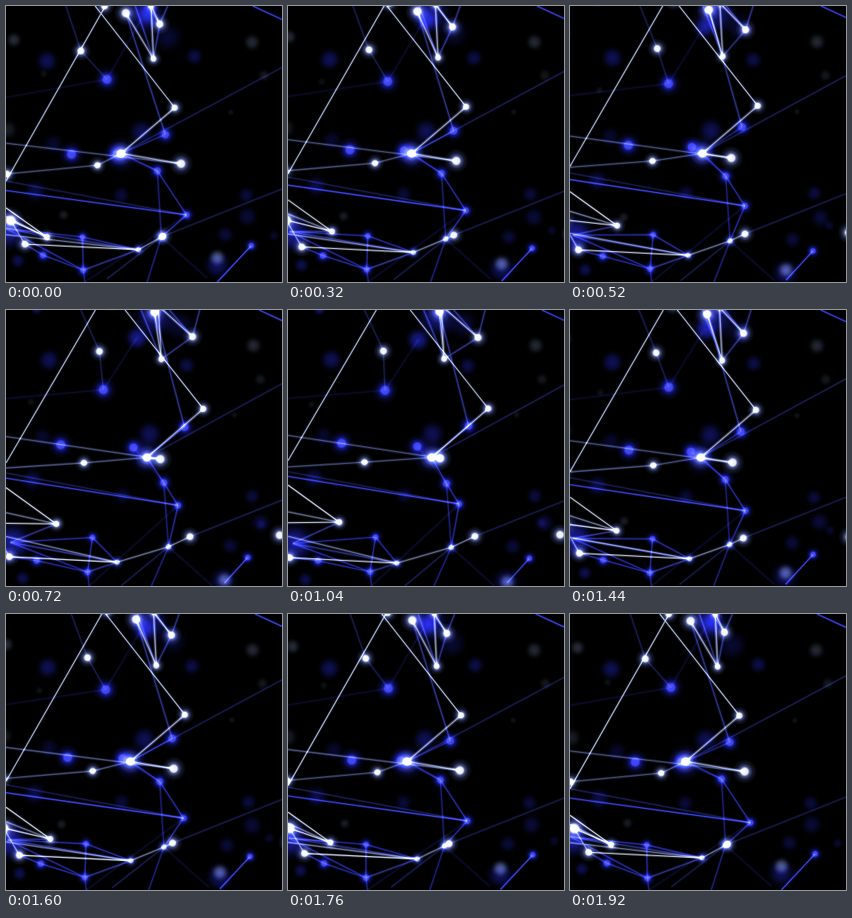
An HTML page with a canvas that plays this animation: 350 px wide and 350 px high, repeating every 1.96 s.

```html
<!DOCTYPE html>
<html lang="en">
<head>
<meta charset="utf-8">
<title>Drifting network</title>
<style>
html, body { margin: 0; width: 100%; height: 100%; overflow: hidden; background: #000; }
canvas { display: block; width: 350px; height: 350px; }
</style>
</head>
<body>
<canvas id="stage" width="350" height="350"></canvas>
<script>
const ctx = document.getElementById('stage').getContext('2d');
const STEP = 40, STEPS = 49;

// Sway: [step, position, slope]
const sway = [[0, 0, .02], [8, .297, .052], [18, .904, .05], [23.5, 1.015, 0],
  [26, 1, -.025], [36, .547, -.054], [40, .322, -.052], [48, .02, -.02], [49, 0, -.02]];

// Points: x, y at rest, x, y at full sway, radius
const white = {
  a: [214, 129, 254, 125, 4.6], b: [187, 67, 198, 62, 4.3], c: [195, 23, 241, 35, 5.2],
  d: [152, 9, 192, 2, 6], y: [184, 0, 194, -6, 4], e: [95, 57, 121, 52, 5],
  h: [146, 187, 182, 187, 6], i: [116, 202, 97, 193, 4.6], w: [222, 200, 193, 188, 6],
  l: [199, 292, 237, 287, 5], n: [52, 293, 65, 269, 4.4], q: [24, 302, 2, 314, 5],
  r: [6, 272, -22, 270, 7], v: [1, 213, -16, 200, 5], u: [366, 291, 345, 285, 5.5],
  x: [125, 0, 135, -12, 5]
};
const pale = { z: [197, 293, 207, 301, 4], m: [168, 309, 138, 321, 3.8] };
const blue = {
  f: [128, 93, 123, 102, 6.5], g: [202, 163, 229, 147, 5.6], j: [192, 209, 201, 220, 5],
  k: [229, 265, 217, 246, 4.4], o: [97, 293, 111, 288, 4], p: [98, 335, 104, 332, 4.4],
  s: [47, 316, 38, 318, 4.5], t: [311, 304, 306, 315, 4], '1': [83, 188, 68, 169, 6.5],
  '2': [140, 188, 164, 173, 6]
};
// Line ends beyond or on the border
const rim = {
  A: [0, 222, 0, 191], B: [126, 0, 112, 0], C: [113, 0, 155, 0], D: [350, 78, 350, 95],
  E: [0, 174, 0, 159], F: [0, 213, 0, 199], G: [0, 234, 0, 211], H: [0, 222, 0, 205],
  I: [179, 350, 185, 350], J: [350, 232, 350, 242], K: [128, 346, 148, 350],
  L: [0, 256, 0, 222], M: [0, 267, 0, 256], N: [0, 290, 0, 287], O: [268, 350, 278, 346],
  P: [313, 0, 322, 0], Q: [350, 17, 350, 13], R: [76, 0, 97, 0], S: [0, 116, 0, 112],
  T: [164, 0, 172, 0], U: [205, 0, 250, 0], V: [180, 0, 210, 0], W: [255, 345, 262, 350],
  X: [100, 350, 106, 350], Y: [0, 282, 6, 296], Z: [172, 16, 165, 38]
};
// Out-of-focus spots, last value is strength
const blueHaze = [
  [52, 70, 55, 63, 16, .38], [239, 64, 228, 71, 13, .32], [180, 10, 165, 38, 17, .6],
  [176, 10, 190, 8, 30, .5], [172, 160, 183, 157, 18, .38], [37, 235, 33, 213, 16, .3],
  [305, 240, 313, 236, 12, .28], [278, 290, 285, 300, 13, .25], [306, 267, 325, 270, 15, .25],
  [2, 284, 8, 296, 28, .65], [15, 323, 22, 342, 11, .35], [146, 240, 148, 235, 13, .25],
  [268, 328, 277, 345, 20, .4], [60, 175, 45, 160, 15, .2], [146, 188, 182, 186, 24, .5],
  [28, -14, 40, -1, 9, .5], [340, 291, 322, 270, 8, .2], [205, 40, 222, 18, 22, .22]
];
const grayHaze = [
  [312, 46, 314, 45, 12, .28], [10, 43, -20, 30, 11, .3], [268, 319, 278, 345, 12, .55],
  [73, 265, 65, 270, 8, .2], [2, 157, -16, 150, 14, .2], [285, 135, 290, 133, 5, .13],
  [327, 88, 322, 88, 9, .16], [48, 86, 30, 120, 6, .12]
];
// Line groups: pairs of points, colour, strength, glow
const lines = [
  ['AB Ca', '195,212,255', .88, .12],
  ['Ln qm nr', '220,230,255', .85, .15],
  ['yb yc db ha hw', '190,205,255', .62, .25],
  ['Nm mz lz Mn qr', '175,190,255', .55, .14],
  ['iF ih Ew', '130,150,235', .48, .14],
  ['Gk Ot PQ', '60,70,255', .9, .18],
  ['om op qs sp Yp Yo jk zk hj', '55,65,250', .62, .14],
  ['hg jz zI Xp YD1'.slice(0, 11), '50,60,240', .5, .12],
  ['bT cV cU cb dg Yn Ym pm', '75,90,245', .5, .16],
  ['Hk lJ hD zK eR ef', '65,75,225', .34, .08],
  ['fS fZ zW j2 kX', '45,50,215', .18, .06]
];

const points = Object.assign({}, white, pale, blue, rim);

function swayAt(step) {
  const n = sway.findIndex(key => key[0] > step);
  const [x0, y0, m0] = sway[n - 1], [x1, y1, m1] = sway[n];
  const d = x1 - x0, s = (step - x0) / d, s2 = s * s, s3 = s2 * s;
  return (2 * s3 - 3 * s2 + 1) * y0 + (s3 - 2 * s2 + s) * d * m0
    + (3 * s2 - 2 * s3) * y1 + (s3 - s2) * d * m1;
}

const place = (p, u) => [p[0] + (p[2] - p[0]) * u, p[1] + (p[3] - p[1]) * u];

function spot([x, y], r, stops) {
  const fill = ctx.createRadialGradient(x, y, 0, x, y, r);
  stops.forEach(([at, rgb, alpha]) => fill.addColorStop(at, `rgba(${rgb},${alpha})`));
  ctx.fillStyle = fill;
  ctx.fillRect(x - r, y - r, 2 * r, 2 * r);
}

function haze(spots, rgb, u) {
  spots.forEach(p => spot(place(p, u), p[4],
    [[0, rgb, p[5]], [.4, rgb, p[5] * .7], [.75, rgb, p[5] * .18], [1, rgb, 0]]));
}

function nodes(group, core, glow, u) {
  Object.values(group).forEach(p => spot(place(p, u), p[4] * 2.6,
    [[0, core, 1], [.27, core, .95], [.42, glow, .5], [.65, glow, .16], [1, glow, 0]]));
}

function strokePairs([pairs, rgb, alpha, glow], u) {
  ctx.beginPath();
  pairs.split(' ').forEach(([from, to]) => {
    ctx.moveTo(...place(points[from], u));
    ctx.lineTo(...place(points[to], u));
  });
  [[4, glow], [1.1, alpha]].forEach(([width, a]) => {
    ctx.lineWidth = width;
    ctx.strokeStyle = `rgba(${rgb},${a})`;
    ctx.stroke();
  });
}

function draw(now) {
  const u = swayAt(Math.floor(now / STEP) % STEPS);
  ctx.globalCompositeOperation = 'source-over';
  ctx.fillStyle = '#000';
  ctx.fillRect(0, 0, 350, 350);
  ctx.globalCompositeOperation = 'lighter';
  haze(blueHaze, '40,45,235', u);
  haze(grayHaze, '130,150,190', u);
  lines.forEach(group => strokePairs(group, u));
  nodes(blue, '65,72,255', '35,40,230', u);
  nodes(pale, '170,185,255', '70,85,255', u);
  nodes(white, '245,248,255', '130,150,255', u);
}

const start = performance.now();
function tick() {
  draw(performance.now() - start);
  requestAnimationFrame(tick);
}
tick();
</script>
</body>
</html>
```
